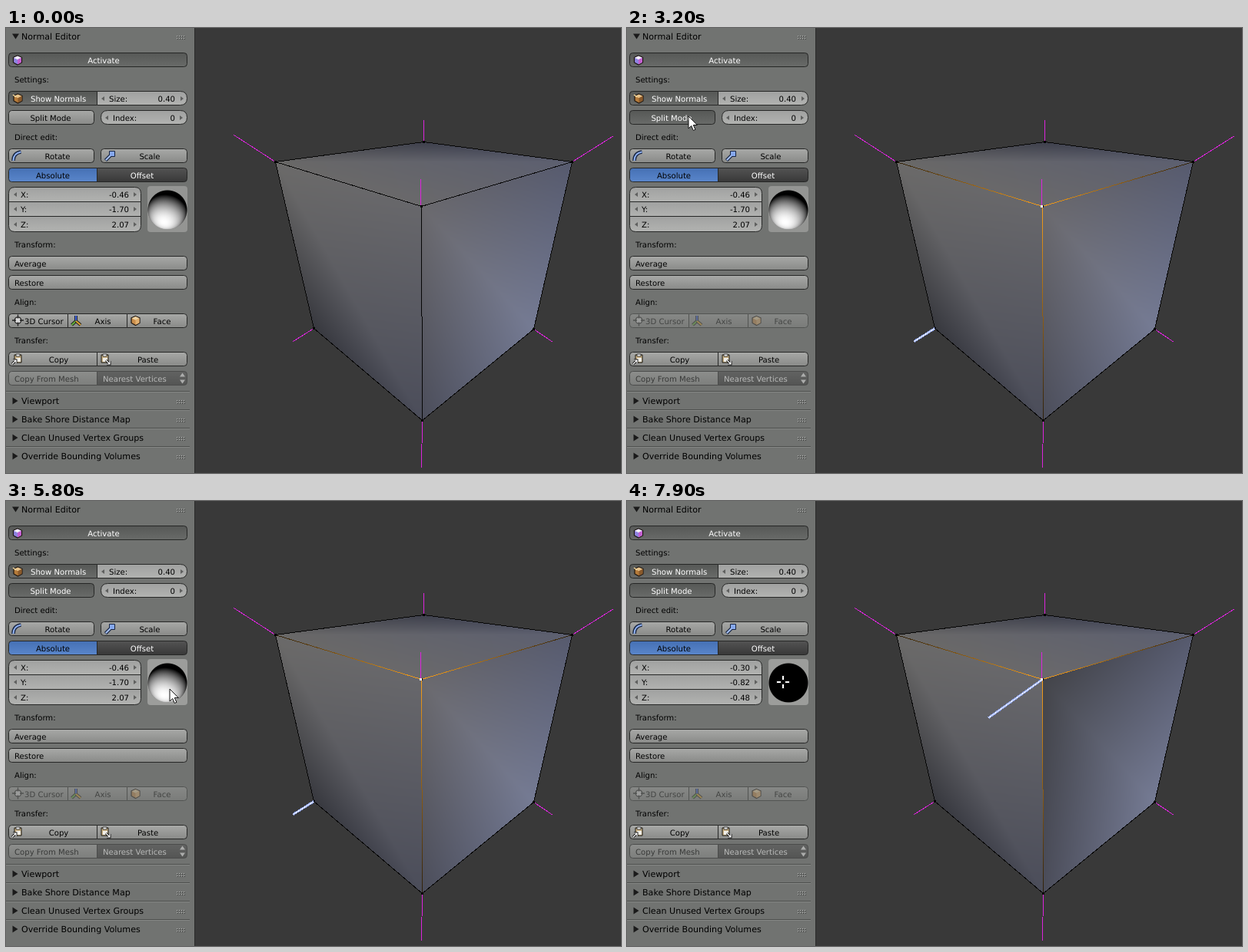
An HTML page with a canvas for the animation above (8000 ms loop, 800 by 580 pixels).

```html
<!DOCTYPE html>
<html lang="en">
<head>
<meta charset="utf-8">
<title>Normal Editor</title>
<style>
html, body { margin: 0; width: 100%; height: 100%; overflow: hidden; background: #393939; }
canvas, svg { position: absolute; left: 0; top: 0; display: block; }
text { font-family: "DejaVu Sans", sans-serif; font-size: 10.1px; text-rendering: geometricPrecision; white-space: pre; }
.crisp { shape-rendering: crispEdges; fill: none; }
</style>
</head>
<body>
<canvas id="cube" width="800" height="580"></canvas>
<svg id="ui" width="800" height="580"></svg>
<canvas id="ball" width="52" height="52" style="left:184px;top:211px"></canvas>
<svg id="top" width="800" height="580"></svg>
<script>
const LOOP = 8000, STEP = 100;
const NS = 'http://www.w3.org/2000/svg';
const ui = document.getElementById('ui');
const topLayer = document.getElementById('top');

function el(parent, tag, attrs, text) {
  const n = document.createElementNS(NS, tag);
  for (const k in attrs) n.setAttribute(k, attrs[k]);
  if (text !== undefined) n.textContent = text;
  parent.appendChild(n);
  return n;
}
const set = (n, attrs) => { for (const k in attrs) n.setAttribute(k, attrs[k]); };
const show = (n, on) => n.setAttribute('visibility', on ? 'visible' : 'hidden');
const clamp = (v, a = 0, b = 1) => Math.max(a, Math.min(b, v));
const mix = (a, b, k) => a.map((v, i) => v + (b[i] - v) * k);
const rgb = h => [1, 3, 5].map(i => parseInt(h.slice(i, i + 2), 16));

// Interpolates rows of [time, ...values]; null before the first row.
function track(rows, t) {
  if (t < rows[0][0]) return null;
  const i = rows.findIndex(r => r[0] > t);
  if (i < 0) return rows[rows.length - 1].slice(1);
  const a = rows[i - 1], b = rows[i];
  return mix(a, b, (t - a[0]) / (b[0] - a[0])).slice(1);
}

/* ---------- gradients ---------- */
const defs = el(ui, 'defs', {});
function gradient(id, stops, box = { x1: 0, y1: 0, x2: 0, y2: 1 }) {
  const g = el(defs, 'linearGradient', { id, ...box });
  stops.forEach((c, i) => el(g, 'stop', { offset: i / (stops.length - 1), 'stop-color': c }));
}
gradient('tool', ['#a8a9a7', '#898a88']);
gradient('on', ['#565856', '#696b69']);
gradient('num', ['#a0a1a0', '#b2b3b1']);
gradient('dark', ['#545454', '#383838']);
gradient('blue', ['#4570b4', '#5a86cb']);

/* ---------- viewport ---------- */
const P = {
  B: [543, 148], L: [350, 174], R: [736, 174], F: [540, 232],
  l: [400, 391], r: [686, 392], f: [541, 511]
};
const ctx = document.getElementById('cube').getContext('2d');
const OX = 345, OY = 143, CW = 396, CH = 373;
const img = ctx.createImageData(CW, CH);

function triangle(a, b, c, ca, cb, cc) {
  const det = (b[1] - c[1]) * (a[0] - c[0]) + (c[0] - b[0]) * (a[1] - c[1]);
  const xs = [a[0], b[0], c[0]], ys = [a[1], b[1], c[1]];
  for (let y = Math.min(...ys); y <= Math.max(...ys); y++) {
    for (let x = Math.min(...xs); x <= Math.max(...xs); x++) {
      const u = ((b[1] - c[1]) * (x - c[0]) + (c[0] - b[0]) * (y - c[1])) / det;
      const v = ((c[1] - a[1]) * (x - c[0]) + (a[0] - c[0]) * (y - c[1])) / det;
      const w = 1 - u - v;
      if (u < 0 || v < 0 || w < 0) continue;
      const o = ((y - OY) * CW + x - OX) * 4;
      for (let k = 0; k < 3; k++) img.data[o + k] = u * ca[k] + v * cb[k] + w * cc[k];
      img.data[o + 3] = 255;
    }
  }
}
// Two triangles sharing the diagonal between the first and third corner.
function face(names, colors) {
  const [a, b, c, d] = [...names].map(n => P[n]);
  const [ca, cb, cc, cd] = colors;
  triangle(a, b, c, ca, cb, cc);
  triangle(a, c, d, ca, cc, cd);
}
function drawCube(vec) {
  const corner = mix(rgb('#434449'), rgb('#6a696d'), clamp((vec[2] + 0.48) / 0.8));
  face('LBRF', ['#696867', '#3d3f4b', '#5c5f70', '#6a696b'].map(rgb));
  face('LFfl', ['#6b6a69', '#67676b', '#4b4d5a', '#37383e'].map(rgb));
  face('FRrf', [corner, ...['#565a6e', '#757b94', '#4b4d5a'].map(rgb)]);
  ctx.fillStyle = '#393939';
  ctx.fillRect(0, 0, 800, 580);
  ctx.putImageData(img, OX, OY);
}

function line(a, b, stroke, width = 1) {
  return el(ui, 'line', {
    class: 'crisp', stroke, 'stroke-width': width,
    x1: a[0] + .5, y1: a[1] + .5, x2: b[0] + .5, y2: b[1] + .5
  });
}
for (const e of ['LB', 'BR', 'LF', 'FR', 'Ff', 'Ll', 'Rr', 'lf', 'fr']) line(P[e[0]], P[e[1]], '#060606');
const selEdges = ['L', 'R', 'f'].map(n => {
  const [a, b] = [P.F, P[n]];
  gradient('edge' + n, ['#f9a01c', '#2c1f0a'],
    { gradientUnits: 'userSpaceOnUse', x1: a[0], y1: a[1], x2: b[0], y2: b[1] });
  return line(a, b, `url(#edge${n})`);
});
const MAGENTA = '#dc24dc';
for (const [n, x, y] of [['B', 543, 119], ['L', 296, 139], ['R', 790, 140], ['l', 373, 408],
  ['r', 711, 409], ['f', 540, 573]]) line(P[n], [x, y], MAGENTA);
line([539, 196], [539, 232], MAGENTA);
for (const n in P) el(ui, 'rect', { x: P[n][0] - 1, y: P[n][1] - 1, width: 3, height: 3, fill: '#000' });
const activeNormal = [line([0, 0], [0, 0], '#93a8ee', 3), line([0, 0], [0, 0], '#eef2ff', 1)];
const selDot = el(ui, 'rect', { x: 538, y: 231, width: 3, height: 3, fill: '#fff' });

/* ---------- panel ---------- */
el(ui, 'rect', { width: 245, height: 580, fill: '#717371' });
el(ui, 'rect', { x: 245, width: 1, height: 580, fill: '#2c2c2c' });

function text(x, cy, s, o = {}) {
  return el(o.g || ui, 'text', {
    x, y: cy + 4, fill: o.fill || '#000', 'text-anchor': o.anchor || 'start',
    ...(o.size ? { style: `font-size:${o.size}px` } : {})
  }, s);
}
const mid = (x, cy, s, fill, g) => text(x, cy, s, { anchor: 'middle', fill, g });

// c lists the radii of the corners: top left, top right, bottom right, bottom left.
function button(x, y, w, h, fill, c = [4, 4, 4, 4], g = ui) {
  x += .5; y += .5;
  const [a, b, d, e] = c;
  return el(g, 'path', {
    d: `M${x + a} ${y}H${x + w - b}q${b} 0 ${b} ${b}V${y + h - d}q0 ${d} ${-d} ${d}` +
       `H${x + e}q${-e} 0 ${-e} ${-e}V${y + a}q0 ${-a} ${a} ${-a}Z`,
    fill: `url(#${fill})`, stroke: '#262726'
  });
}
const LEFT = [4, 0, 0, 4], RIGHT = [0, 4, 4, 0], NONE = [0, 0, 0, 0];
const shape = (d, fill, stroke = 'none', width = 1, g = ui) =>
  el(g, 'path', { d, fill, stroke, 'stroke-width': width });

function arrows(xl, xr, cy) {
  shape(`M${xl + 2} ${cy - 3}v6l-4 -3zM${xr - 2} ${cy - 3}v6l4 -3z`, '#5f605f');
}
function grip(cy) {
  for (let i = 0; i < 4; i++) for (let j = 0; j < 2; j++) {
    const x = 222 + i * 3, y = cy - 1 + j * 3;
    el(ui, 'rect', { x: x + 1, y: y + 1, width: 1, height: 1, fill: '#3e3f3e' });
    el(ui, 'rect', { x, y, width: 1, height: 1, fill: '#b4b5b4' });
  }
}
function cubeIcon(x, y, topC, leftC, rightC, g = ui) {
  shape(`M${x} ${y - 6}l5.5 2.5v6.5l-5.5 3l-5.5 -3v-6.5z`, leftC, '#1c1510', 1.2, g);
  shape(`M${x} ${y - 5.5}l5 2.3l-5 2.5l-5 -2.5z`, topC, 'none', 1, g);
  shape(`M${x} ${y - .7}l5 -2.5v6l-5 2.7z`, rightC, 'none', 1, g);
}
function clipIcon(x, y, out) {
  shape(`M${x - 4} ${y - 6}h9v10h-9z`, '#c9b184', '#1d1a14');
  shape(`M${x - 2} ${y - 7}h5v3h-5z`, '#e8e8e8', '#222', .8);
  shape(`M${x - 2} ${y - 2}h6v5h-6z`, '#f0eee8');
  const d = out ? `M${x - 7} ${y + 6}l5 -5m-4 0h4v4` : `M${x + 2} ${y + 1}l5 5m0 -4v4h-4`;
  shape(d, 'none', '#111', 3);
  shape(d, 'none', '#fff', 1.2);
}

// Panel titles
text(20, 11, 'Normal Editor', { size: 11.1 });
shape('M8 7.5h9l-4.5 7z', '#1a1a1a');
grip(11);
['Viewport', 'Bake Shore Distance Map', 'Clean Unused Vertex Groups', 'Override Bounding Volumes'].forEach((s, i) => {
  const cy = 486 + i * 24;
  el(ui, 'rect', { x: 0, y: cy - 13, width: 239, height: 1, fill: '#4d4f4d' });
  el(ui, 'rect', { x: 0, y: cy - 12, width: 239, height: 1, fill: '#858785' });
  shape(`M8.5 ${cy - 4.5}v9l7 -4.5z`, '#1a1a1a');
  text(20, cy, s, { size: 11.1 });
  grip(cy);
});
for (const [s, y] of [['Settings:', 67], ['Direct edit:', 142], ['Transform:', 282], ['Align:', 357], ['Transfer:', 407]])
  text(11, y, s);

button(3, 32, 232, 18, 'on');
mid(127, 42, 'Activate', '#fff');
cubeIcon(15, 42, '#f4eefc', '#8f84e0', '#c45fd0');

button(3, 82, 115, 18, 'on', LEFT);
text(32, 92, 'Show Normals', { fill: '#fff' });
cubeIcon(15.5, 92, '#e8c48c', '#b57b3a', '#8a5a2c');
shape('M9 87l4 3', 'none', '#f5d9a0', 1.5);

const ROUND = [9, 9, 9, 9];
button(118, 82, 117, 18, 'num', [0, 9, 9, 0]);
arrows(126, 229, 92);
text(134, 92, 'Size:');
text(220, 92, '0.40', { anchor: 'end' });

const split = button(3, 107, 111, 18, 'tool');
const splitText = mid(58, 117, 'Split Mode');
button(123, 107, 112, 18, 'num', ROUND);
arrows(131, 228, 117);
text(139, 117, 'Index:');
text(220, 117, '0', { anchor: 'end' });

button(3, 157, 111, 18, 'tool');
mid(67, 167, 'Rotate');
shape('M9.5 173q0 -10 10 -11.5', 'none', '#16233f', 4.5);
shape('M9.5 173q0 -10 10 -11.5', 'none', '#8fb0f0', 2.2);
button(123, 157, 112, 18, 'tool');
mid(187, 167, 'Scale');
shape('M129.500 172.500l6 -6', 'none', '#16233f', 4.5);
shape('M134.500 160.500h7v7h-7z', '#86a8ee', '#16233f');
shape('M129.800 172.200l6 -6', 'none', '#a5c0f6', 2);

button(3, 182, 115, 18, 'blue', LEFT);
mid(61, 192, 'Absolute', '#000');
button(118, 182, 117, 18, 'dark', RIGHT);
mid(177, 192, 'Offset', '#fff');

const fields = ['X:', 'Y:', 'Z:'].map((s, i) => {
  const y = [207, 226, 245.5][i], cy = [217, 236, 256][i];
  button(3, Math.floor(y), 172, i ? 20 : 19, 'num', [[8, 8, 0, 0], NONE, [0, 0, 8, 8]][i]);
  arrows(12, 168, cy);
  text(19, cy, s);
  return text(160, cy, '', { anchor: 'end' });
});
const ballBox = el(ui, 'rect', { x: 184, y: 206, width: 52, height: 60, rx: 4 });

for (const [s, cy] of [['Average', 307], ['Restore', 332]]) {
  button(3, cy - 10, 232, 18, 'tool');
  text(11, cy, s);
}

const align = el(ui, 'g', {});
button(3, 372, 77, 18, 'tool', LEFT, align);
button(80, 372, 77, 18, 'tool', NONE, align);
button(157, 372, 78, 18, 'tool', RIGHT, align);
text(24, 382, '3D Cursor', { g: align });
mid(126, 382, 'Axis', '#000', align);
mid(203, 382, 'Face', '#000', align);
el(align, 'circle', { cx: 15.5, cy: 381, r: 4.2, fill: '#d8d8d8', stroke: '#222', 'stroke-width': 1.3 });
shape('M15.500 373.500v5m0 5v5m-7.500 -7.500h5m5 0h5', 'none', '#222', 1.3, align);
for (const [d, c] of [['V375', '#3f62d8'], ['L85.500 387', '#62b03a'], ['L97 387', '#dba02c']]) {
  shape('M91 382' + d, 'none', '#1c1c1c', 4, align);
  shape('M91 382' + d, 'none', c, 2.2, align);
}
cubeIcon(168.5, 381.5, '#f0d4a4', '#c98d4a', '#e2b070', align);

button(3, 422, 115, 18, 'tool', LEFT);
button(118, 422, 117, 18, 'tool', RIGHT);
mid(68.5, 432, 'Copy');
mid(184.5, 432, 'Paste');
clipIcon(15, 432, true);
clipIcon(128, 432, false);

const off = el(ui, 'g', { opacity: .5 });
button(3, 447, 115, 18, 'tool', LEFT, off);
text(11, 457, 'Copy From Mesh', { g: off });
button(118, 447, 117, 18, 'dark', RIGHT, off);
text(126, 457, 'Nearest Vertices', { fill: '#fff', g: off });
shape('M226 454.500h7l-3.500 -5zM226 458.500h7l-3.500 5z', '#e8e8e8', 'none', 1, off);

/* ---------- direction ball ---------- */
const ballCtx = document.getElementById('ball').getContext('2d');
function drawBall([lx, ly, lz]) {
  const R = 25.5, out = ballCtx.createImageData(52, 52);
  const back = 1.5 * Math.min(0, lz);
  for (let j = 0; j < 52; j++) for (let i = 0; i < 52; i++) {
    const x = (i - 25.5) / R, y = (25.5 - j) / R, q = x * x + y * y;
    const o = (j * 52 + i) * 4;
    const z = Math.sqrt(Math.max(0, 1 - q));
    const v = 255 * clamp(x * lx + y * ly + z * lz + back);
    out.data[o] = out.data[o + 1] = out.data[o + 2] = v;
    out.data[o + 3] = 255 * clamp((1 - Math.sqrt(q)) * R + .5);
  }
  ballCtx.putImageData(out, 0, 0);
}

/* ---------- pointers ---------- */
const arrow = shape('M0 0V16l3.700 -3.500l2.600 6l2.600 -1.100l-2.600 -5.900h5z', '#fff', '#111', 1, topLayer);
const cross = el(topLayer, 'g', {});
for (const [c, w, a, b] of [['#111', 4, 2, 9], ['#fff', 2, 3, 8]])
  shape(`M${-b} 0H${-a}M${a} 0H${b}M0 ${-b}V${-a}M0 ${a}V${b}`, 'none', c, w, cross);

/* ---------- motion ---------- */
const POINTER = [
  [600, 653, 101], [800, 533, 236], [1000, 533, 236], [1900, 155, 244], [2400, 80, 115],
  [3700, 80, 115], [4500, 202, 197], [4600, 205, 209], [5500, 216, 238], [5800, 213, 245],
  [6000, 213, 245], [6700, 222, 262], [6900, 222, 262], [7800, 203, 267], [7900, 203, 236]
];
const DRAG = [[6000, -8.8, -32.5], [6700, 0, -48.02], [6900, 0, -48.02], [7800, -20.27, -54.89]];
const START = [-0.46, -1.70, 2.07];
const REST = START.map(v => v / Math.hypot(...START));

// Past the rim the drag continues onto the back of the ball.
function dragVector(x, y) {
  const R = 52, d = Math.hypot(x, y), len = d < R ? d / R : 2 - d / R;
  return [x / d * len, y / d * len, Math.sqrt(1 - len * len) * (d < R ? 1 : -1)];
}
function normalTip([x, y, z]) {
  const depth = x - y;
  return [P.F[0] + (x + y) * (42 + 40 * depth), P.F[1] + 14.7 * depth - 88 * z];
}

let last = '';
function render(t) {
  const dragging = t >= 6100;
  const vec = dragging ? dragVector(...track(DRAG, t)) : REST;
  const splitOn = t >= 3000, selected = t >= 1100;

  const key = vec.join();
  if (key !== last) {
    last = key;
    drawCube(vec);
    drawBall(vec);
    (dragging ? vec : START).forEach((v, i) => { fields[i].textContent = v.toFixed(2); });
  }

  selEdges.forEach(n => show(n, selected));
  show(selDot, selected);
  const from = dragging ? P.F : P.l, to = dragging ? normalTip(vec) : [373, 408];
  activeNormal.forEach(n => {
    show(n, splitOn);
    set(n, { x1: from[0] + .5, y1: from[1] + .5, x2: to[0] + .5, y2: to[1] + .5 });
  });

  set(split, { fill: t >= 2900 ? 'url(#on)' : 'url(#tool)' });
  set(splitText, { fill: t >= 2900 ? '#fff' : '#000' });
  set(align, { opacity: splitOn ? .4 : 1 });
  const held = dragging && t < 7900;
  set(ballBox, { fill: held ? '#6a6b6a' : t >= 4600 ? '#9c9d9b' : '#949593' });

  const p = track(POINTER, t);
  const isCross = p && (p[0] > 245 || dragging);
  show(cross, isCross);
  show(arrow, p && !isCross);
  if (p) set(isCross ? cross : arrow, { transform: `translate(${Math.round(p[0])} ${Math.round(p[1])})` });
}

const began = performance.now();
function tick() {
  const t = (performance.now() - began) % LOOP;
  render(Math.floor(t / STEP) * STEP);
  requestAnimationFrame(tick);
}
tick();
</script>
</body>
</html>
```
